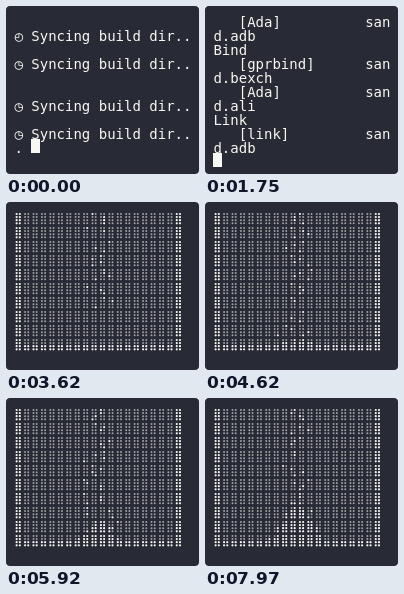
Animation, 193 px wide and 168 px high, one loop 8 s. Source, as an HTML page with a canvas:

```html
<!DOCTYPE html>
<html lang="en">
<head>
<meta charset="utf-8">
<title>Falling sand in a terminal</title>
<style>
html, body { margin: 0; width: 100%; height: 100%; overflow: hidden; background: #fff; }
#term { position: absolute; width: 193px; height: 168px; border-radius: 4px; background: #282a36; overflow: hidden; }
#text { position: absolute; left: 8.43px; top: 9px; margin: 0; color: #f8f8f2;
  font: 14px/14px "DejaVu Sans Mono", monospace; }
#text div { height: 14px; white-space: pre; }
#text i { display: inline-block; width: 8.43px; height: 14px; vertical-align: top; font-style: normal; }
#text .info { color: #8be9fd; font-size: 10.5px; }
#text .pink { color: #ff79c6; }
#cursor { position: absolute; width: 8.43px; height: 14px; background: #f8f8f2; }
canvas { position: absolute; left: 0; top: 0; }
</style>
</head>
<body>
<div id="term">
  <div id="cursor"></div>
  <div id="text"></div>
  <canvas id="grid" width="193" height="168"></canvas>
</div>
<script>
const LOOP = 8000, RUN = 1970, STEP = 50, CELL = 8.4287, ROW = 14;
const COLS = 40, ROWS = 40, WALL = 2, FLOOR = ROWS - WALL, FIRST = 6;
const $ = id => document.getElementById(id);
const text = $("text"), cursor = $("cursor"), canvas = $("grid"), ctx = canvas.getContext("2d");

const sync = icon => `<i>${icon}</i> Syncing build dir..`;
const A = sync("◴"), B = sync("◷");
const build = [
  '<i class="info">ⓘ</i> Building <b>sand</b>=<b class="pink">0.1.0</b>',
  '<b class="pink">-dev/sand.gpr</b>...'
];
const job = (tool, ext) => ["   " + `[${tool}]`.padEnd(15) + "san", "d." + ext];

// Each screen: start time, lines, cursor column and row
const screens = [
  [0, ["", A, "", B, "", "", B, "", B, "."], 2, 9],
  [50, [B, "", "", B, "", B, "", "", "", B, "."], 2, 10],
  [100, [B, "", "", B, "", B, "", "", "", B], 0, 10],
  [200, [B, "", B, "", "", "", B, "", ...build], 0, 10],
  [490, ["", "", "", B, "", ...build, "Compile", ...job("Ada", "adb")], 0, 10],
  [1750, [...job("Ada", "adb"), "Bind", ...job("gprbind", "bexch"), ...job("Ada", "ali"),
    "Link", ...job("link", "adb")], 0, 10]
];

function simulate() {
  let seed = 11;
  const rand = () => (seed = seed * 16807 % 2147483647) / 2147483647;
  const solid = new Uint8Array(COLS * ROWS), frames = [];
  for (let y = 0; y < ROWS; y++)
    for (let x = 0; x < COLS; x++)
      solid[y * COLS + x] = x < WALL || x >= COLS - WALL || y >= FLOOR ? 1 : 0;

  for (let n = 0; n * STEP + RUN < LOOP; n++) {
    for (let y = FLOOR - 1; y >= 0; y--)
      for (let x = WALL; x < COLS - WALL; x++) {
        const at = y * COLS + x, below = at + COLS;
        if (!solid[at]) continue;
        const side = rand() < 0.5 ? -1 : 1;
        let move = 0;
        if (!solid[below]) {
          const drift = rand() < 0.12 ? side : 0;
          move = solid[below + drift] ? below : below + drift;
        } else {
          // Slide only off steep slopes: two free places beside the support
          move = [below + side, below - side].find(p => !solid[p] && !solid[p + COLS]);
        }
        if (move) { solid[at] = 0; solid[move] = 1; }
      }
    if (n >= FIRST && rand() < 0.85) solid[18 + Math.floor(rand() * 4)] = 1;
    frames.push(solid.slice());
  }
  return frames;
}
const frames = simulate();

function drawGrid(solid) {
  ctx.clearRect(0, 0, 193, 168);
  for (let y = 0; y < ROWS; y++)
    for (let x = 0; x < COLS; x++) {
      const on = solid[y * COLS + x];
      const px = CELL * (1 + (x >> 1)) + (x % 2 ? 5.4 : 2.2);
      const py = 12 + ROW * (y >> 2) + 3.1 * (y % 4);
      ctx.fillStyle = on ? "#f8f8f2" : "rgba(248,248,242,.58)";
      ctx.beginPath();
      ctx.arc(px, py, on ? 1.1 : 1, 0, 7);
      ctx.fill();
    }
}

function drawText([, lines, col, row]) {
  text.innerHTML = lines.map(s => `<div>${s}</div>`).join("");
  cursor.style.left = CELL * (1 + col) + "px";
  cursor.style.top = 7 + ROW * row + "px";
}

let shown;
function draw(now) {
  const t = now % LOOP, running = t >= RUN;
  const view = running ? frames[Math.floor((t - RUN) / STEP)] : screens.findLast(s => t >= s[0]);
  if (view !== shown) {
    shown = view;
    canvas.hidden = !running;
    text.hidden = cursor.hidden = running;
    running ? drawGrid(view) : drawText(view);
  }
}
function tick() {
  draw(performance.now());
  requestAnimationFrame(tick);
}
tick();
</script>
</body>
</html>
```
